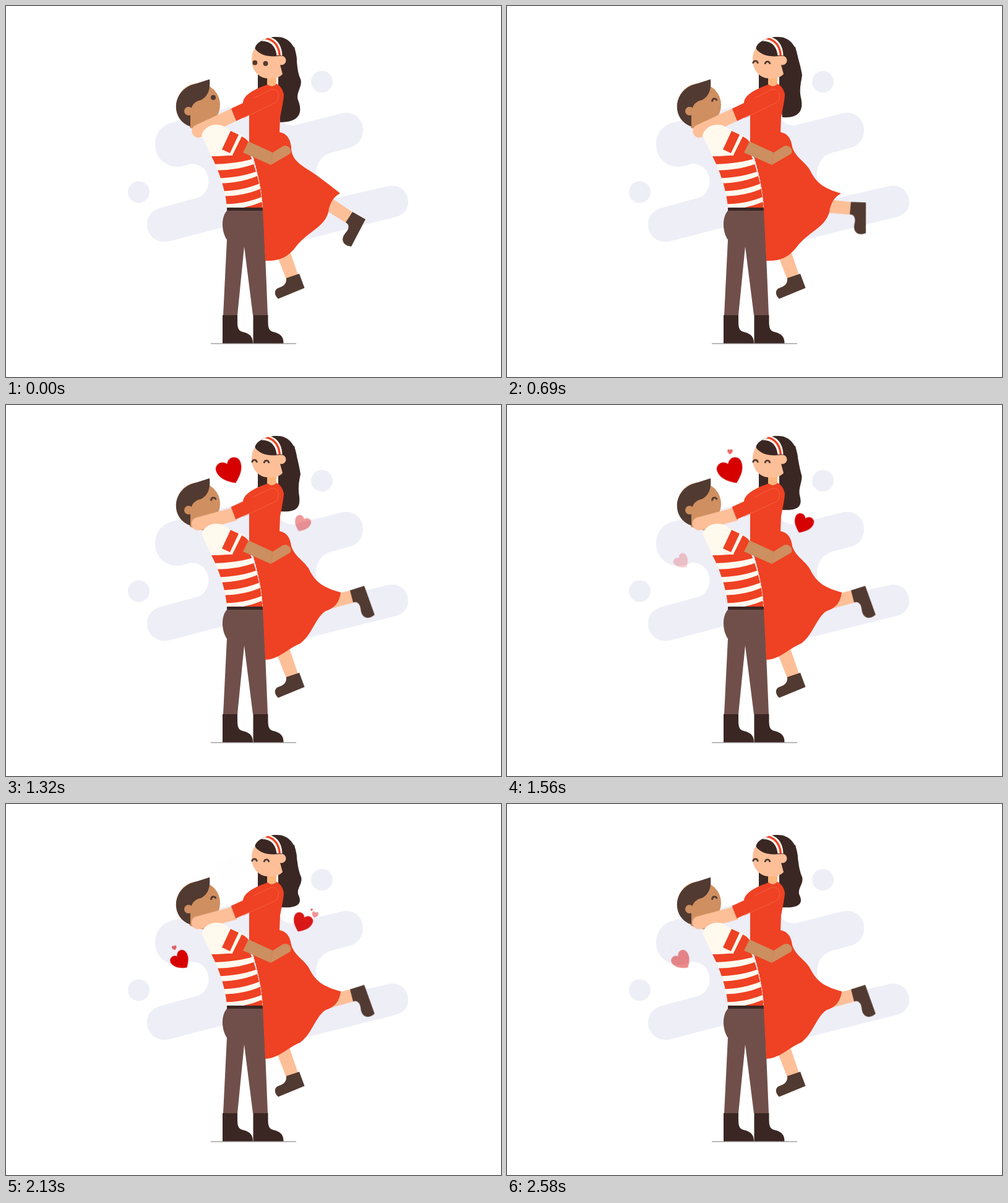
Write an HTML page without scripts that moves like this. It is 800x600 px and loops after 2610 ms.

```html
<!DOCTYPE html>
<html lang="en">
<head>
<meta charset="utf-8">
<title>Happy couple</title>
<style>
html, body { margin: 0; width: 100%; height: 100%; overflow: hidden; background: #fff; }
svg { display: block; width: 100vw; height: 100vh; }

.red { fill: #ef4123; }
.skin { fill: #fdbf98; }
.tan { fill: #cf8f60; }
.hair { fill: #3a2723; }
.brown { fill: #513a31; }
.cream { fill: #fff9ee; }
.lilac { fill: #eeeef7; }
.line { fill: none; }

.anim { animation: 2.61s linear infinite both; }

.kick { animation-name: kick; transform-origin: 520px 321px; }
@keyframes kick {
  0%, 10% { transform: none; animation-timing-function: ease-in; }
  26.4% { transform: translate(-5.2px, 3.7px) rotate(-27.3deg); animation-timing-function: ease-out; }
  38.5%, 100% { transform: rotate(-47.3deg); }
}

.skirt { animation-name: skirt; }
@keyframes skirt {
  0%, 8% { d: path("M393 200V222C404 262 413 290 415 331L419 412C440 413 455 407 468 390C487 365 515 358 521 333C523 318 530 308 540 303C525 291 505 275 487 264C468 252 461 243 461 228C459 212 452 206 442 204Z"); }
  26.4% { d: path("M393 200V222C404 262 413 290 415 331L419 412C440 413 455 407 468 390C487 365 515 358 521 333C523 318 530 308 540 303C515 296 502 288 492 270C485 253 467 247 461 228C459 212 452 206 442 204Z"); }
  38.5%, 100% { d: path("M393 200V222C404 262 413 290 415 331L419 412C440 412 455 394 475 386C495 372 500 343 517 333C530 329 539 320 541 303C515 296 502 288 492 270C485 253 467 247 461 228C459 212 452 206 442 204Z"); }
}

.locks { animation-name: locks; animation-timing-function: ease-in-out; }
@keyframes locks {
  0% { d: path("M466 66C472 90 469 102 476 118C480 130 468 140 472 152C480 172 475 188 443 188L440 140V80Z"); }
  26.4% { d: path("M466 66C470 84 475 98 477 112C475 125 472 135 475 148C479 165 476 182 445 180L440 140V80Z"); }
  39% { d: path("M466 66C470 84 474 98 476 112C475 125 475 138 475 148C474 170 466 186 441 182L440 140V80Z"); }
  50.6% { d: path("M466 66C470 84 474 98 476 112C473 125 472 135 474 148C476 166 470 174 442 172L440 140V80Z"); }
  69%, 100% { d: path("M466 66C472 91 470 101 477 118C480 130 468 137 473 148C479 161 472 169 444 167L440 140V80Z"); }
}

.forearm { animation-name: forearm; transform-origin: 368px 177px; }
@keyframes forearm {
  0%, 38% { transform: none; animation-timing-function: ease-in-out; }
  52%, 100% { transform: translate(3px, 0) rotate(10deg); }
}
.sleeve { animation-name: sleeve; transform-origin: 430px 145px; }
@keyframes sleeve {
  0%, 38% { transform: none; animation-timing-function: ease-in-out; }
  52%, 100% { transform: rotate(1deg); }
}

.open { animation-name: open; }
.smile { animation-name: smile; }
@keyframes open { 0%, 18.3% { opacity: 1; } 18.4%, 100% { opacity: 0; } }
@keyframes smile { 0%, 18.3% { opacity: 0; } 18.4%, 100% { opacity: 1; } }

/* hides hearts left over from the previous loop */
.late { animation-name: late; }
@keyframes late { 0%, 30% { visibility: hidden; } 30.1%, 100% { visibility: visible; } }

.hearts { fill: #d60000; }
.hearts use { animation: 2.61s linear var(--wait, 0s) infinite both; }
.hearts .big { animation-name: big; }
.hearts .puff { animation-name: puff; }
.hearts .dot { animation-name: dot; }
.second { --wait: .3s; }
.third { --wait: .6s; }
@keyframes big {
  0%, 34.5% { opacity: 0; transform: scale(.75); }
  46% { opacity: 1; transform: scale(.96); }
  48.3%, 69% { opacity: 1; transform: none; }
  81.7%, 100% { opacity: 0; transform: none; }
}
@keyframes puff {
  0%, 52.8% { opacity: 0; transform: scale(0); }
  52.9% { opacity: .8; transform: scale(0); }
  57.5% { opacity: .62; transform: scale(.5); }
  70.1% { opacity: .42; transform: none; }
  76%, 100% { opacity: 0; transform: none; }
}
@keyframes dot {
  0%, 65% { opacity: 0; transform: scale(0); }
  65.1% { opacity: .9; transform: scale(0); }
  70.1% { opacity: .75; transform: scale(.7); }
  76%, 100% { opacity: 0; transform: none; }
}
</style>
</head>
<body>
<svg viewBox="0 0 800 600">
  <defs>
    <path id="heart" d="M0 21C-12 13-21 4-21-8C-21-15-16-19-10.500-19C-6-19-2-16.500 0-12.500C2-16.500 6-19 10.500-19C16-19 21-15 21-8C21 4 12 13 0 21Z"/>
    <path id="boot" d="M350 500H374V511C374 523 377 526 384 527.500C394 530 399 535 399 545.500H350Z"/>
    <path id="smile" d="M-4 2C-3-3.500 3-3.500 4 2" fill="none" stroke="#513a31" stroke-width="2.800"/>
    <path id="shirt" d="M316 209C319 198 330 191 341 192C351 192 357 198 363 202C377 206 388 213 392 220L391 232C402 258 412 288 414.500 326H357C355 295 341 260 332 243Z"/>
    <clipPath id="shirtClip"><use href="#shirt"/></clipPath>
  </defs>

  <g class="lilac">
    <circle cx="214.500" cy="301" r="17.500"/>
    <circle cx="510.500" cy="122.500" r="17.500"/>
    <path d="M277 260C257 260 241 245 241 224C241 205 253 192 270 188L362 164C400 155 425 165 440 180Q452 197 470 192L541 174C559 169 577 180 577 201C577 215 568 226 556 229L530 236C510 240 500 255 501 275C502 300 520 315 540 309L619 291C636 288 650 300 650 317C650 329 642 338 630 341L470 381L425 385L400 345L262 381C245 384 228 373 228 353C228 340 236 331 248 327L310 310C335 302 335 255 298 255Q285 260 277 260Z"/>
  </g>

  <!-- his legs -->
  <path d="M331 546H469" stroke="#a3a0a0" stroke-width="1.400"/>
  <path fill="#704f4a" d="M358 330C347 340 348 365 357 378L351 500H374L385 389L399 500H423L416 330Z"/>
  <g class="hair">
    <use href="#boot"/>
    <use href="#boot" x="49.500"/>
    <path d="M357 326H415V331H357Z"/>
  </g>

  <!-- her hair and head -->
  <g class="hair">
    <path class="anim locks" d="M466 66C472 90 469 102 476 118C480 130 468 140 472 152C480 172 475 188 443 188L440 140V80Z"/>
    <path d="M403 70C402 60 420 50 438 50C456 50 468 63 470 85V104L445 112L430 90ZM407 109V136L424 128V112Z"/>
  </g>
  <path fill="#ffb67c" d="M422 112H437V131H422Z"/>
  <path class="skin" d="M403 68C396 75 396 90 399 99C404 112 415 118 426 117C436 117 443 115 447 110L443 95V78Z"/>
  <circle class="skin" cx="445" cy="88" r="7.500"/>
  <path class="hair" d="M402.500 69C402 60 420 50 438 50L447 80C430 83 412 82 402.500 69Z"/>
  <path class="cream" d="M413 57C428 56 436 66 437.500 80H446.500C446 66 440 54 427 50.500Q419 52 413 57Z"/>
  <path class="red" d="M418 54C432 55 440 66 440.500 80H444C443 65 435 54 423 51.500Z"/>

  <!-- her legs and dress -->
  <path class="skin" d="M432 388H456L472 435L453 442Z"/>
  <path class="brown" d="M453 440L474 433L482.500 456L440 473.500C434 468 433 461 438 457C445 454 454 452 453 440Z"/>
  <g class="anim kick">
    <path class="skin" d="M515 303L561 334L550 351L510 326Z"/>
    <path class="brown" d="M560 333L581 345L558 389C547 388 542 381 545 373C547 367 554 364 553.500 356Q553 352 549 350Z"/>
  </g>
  <g class="red">
    <path class="anim skirt" d="M393 200V222C404 262 413 290 415 331L419 412C440 413 455 407 468 390C487 365 515 358 521 333C523 318 530 308 540 303C525 291 505 275 487 264C468 252 461 243 461 228C459 212 452 206 442 204Z"/>
    <path d="M423 127C405 133 383 143 383 157L393 170V210L442 206L443 180C446 165 449 150 449 143C447 133 441 127 437 126Q430 133 423 127Z"/>
  </g>

  <!-- his head -->
  <circle class="tan" cx="311" cy="160" r="35"/>
  <path class="tan" d="M297 172V197L330 206L344 178Z"/>
  <path class="brown" d="M329 118.500L298 128.500C266 143 268 185 298 195V176C298 160 306 154 314 152.500C324 148 331 138 329 118.500Z"/>
  <circle class="tan" cx="295" cy="170" r="7"/>

  <!-- her arm -->
  <path class="anim forearm skin" d="M368 164L306 193C296 198 300 213 311 213Q318 212 372 186Z"/>
  <g class="anim sleeve">
    <path class="red" d="M364 166L428 135C440 132 445 148 436 156L372 186Z"/>
    <path class="line" d="M384 181L436 156C445 148 440 132 428 135L400 149" stroke="#f56a4e" stroke-width=".8"/>
  </g>

  <!-- his shirt and arm -->
  <use href="#shirt" class="cream"/>
  <path class="line" clip-path="url(#shirtClip)" stroke="#ef4123" stroke-width="12.800" d="M325 249.500Q372 250 406 238.500M332 272Q378 273 412 258M340 293Q382 294 416 277.500M345 314Q388 315 420 298.500M376 334Q400 330 420 321"/>
  <path class="line" d="M393 222C404 262 413 290 414.500 326" stroke="#fff4e8" stroke-width=".7" stroke-dasharray="4 2"/>
  <path class="cream" d="M345 226L363 202L381 211L366 242L346 240Z"/>
  <path class="red" d="M363 202L376 208L362 238L349 232ZM381 211Q388 214 392 220L384 241H366Z"/>
  <path class="tan" d="M431 237L447 227C455 223 464 232 459 239L428 257Z"/>
  <path fill="#cb8f60" d="M392 219L431 237L428 257L383 237Z"/>

  <!-- eyes -->
  <g class="anim open brown">
    <circle cx="402.300" cy="91.700" r="3.900"/>
    <circle cx="419.500" cy="93" r="3.900"/>
    <circle cx="335" cy="148" r="4"/>
  </g>
  <g class="anim smile">
    <use href="#smile" x="401.500" y="91"/>
    <use href="#smile" x="421" y="92"/>
    <use href="#smile" transform="translate(335 152) rotate(-15)"/>
  </g>

  <g class="anim late">
    <g class="hearts">
      <g transform="translate(362.500 107) rotate(-24)"><use href="#heart" class="big"/></g>
      <g transform="translate(360.500 75.500) scale(.35)"><use href="#heart" class="puff"/></g>
      <g transform="translate(348 76) scale(.1)"><use href="#heart" class="dot"/></g>
    </g>
    <g class="hearts second">
      <g transform="translate(478.500 192) rotate(24) scale(.75)"><use href="#heart" class="big"/></g>
      <g transform="translate(499.500 179) rotate(12) scale(.25)"><use href="#heart" class="puff"/></g>
      <g transform="translate(494 171) scale(.12)"><use href="#heart" class="dot"/></g>
    </g>
    <g class="hearts third">
      <g transform="translate(282.500 253) rotate(-40) scale(.72)"><use href="#heart" class="big"/></g>
      <g transform="translate(272 232.500) rotate(-15) scale(.34)"><use href="#heart" class="puff"/></g>
      <g transform="translate(264 231) scale(.1)"><use href="#heart" class="dot"/></g>
    </g>
  </g>
</svg>
</body>
</html>
```
